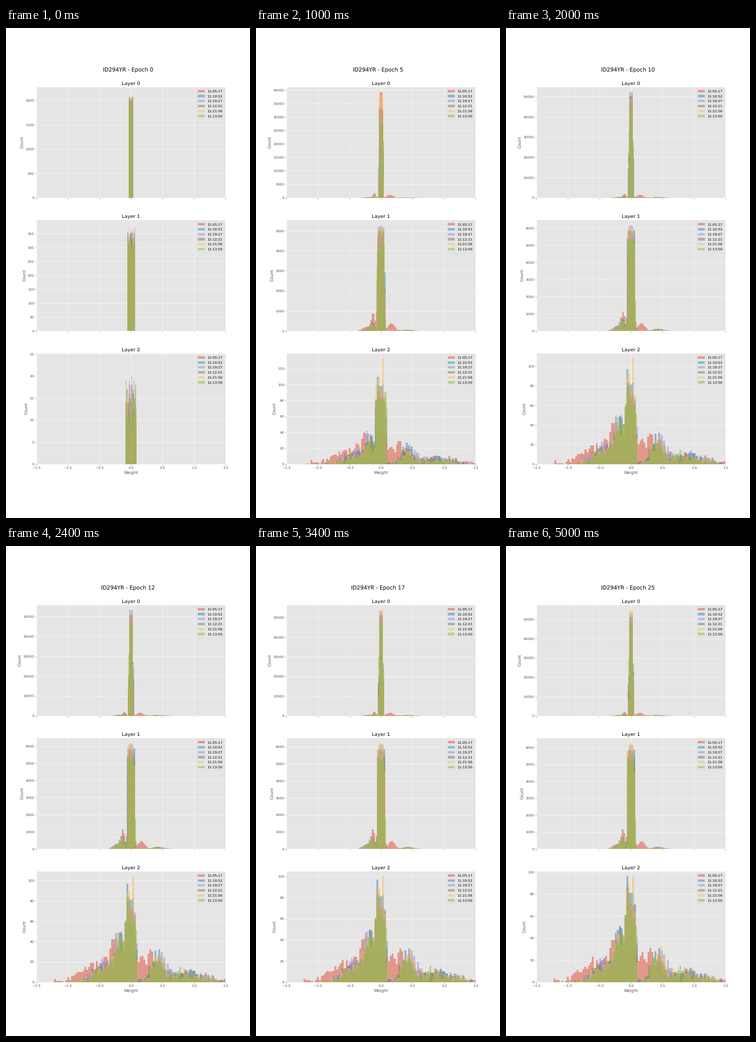
Recreate the animation shown at these times as a matplotlib script. Size 529 by 1058 pixels, loop 5200 ms.

```python
import math
from collections import namedtuple

import matplotlib.pyplot as plt
import numpy as np
from matplotlib.animation import FuncAnimation
from matplotlib.collections import PolyCollection
from matplotlib.patches import Patch

plt.style.use("ggplot")
plt.rcParams["text.hinting"] = "none"

EPOCHS = 26
BINS = 100

# span: final weight range in layer 0; tau, power: how the range grows;
# lag: how far the moved share trails the range; shift: scale of the bumps.
Run = namedtuple("Run", "label color span tau power lag shift")
RUNS = [
    Run("11:05:17", "#E24A33", 1.96, 3.4, 1, .5, 1),
    Run("11:10:52", "#348ABD", 1.91, 5.2, 2, 2, .97),
    Run("11:19:27", "#988ED5", 1.98, 5.2, 2, 2, 1.1),
    Run("11:12:21", "#777777", 1.89, 5.1, 2, 2, .98),
    Run("11:21:56", "#FBC15E", 2.03, 4.5, 1, 2, 1.03),
    Run("11:13:50", "#8EBA42", 1.74, 5.6, 2, 2, .96),
]

# growth and pace scale a run's span and tau. Bumps are the weights that
# leave the uniform start, as (share, centre, sigma).
Layer = namedtuple("Layer", "n_in n_out growth pace first_bumps bumps")
LAYERS = [
    Layer(784, 256, 1, 1,
          [(.032, -.105, .022), (.012, -.2, .05), (.05, .14, .05)],
          [(.015, -.11, .022), (.01, -.2, .03), (.014, .42, .06)]),
    Layer(256, 128, 1.32, .75,
          [(.1, -.125, .03), (.045, -.23, .06), (.08, .16, .06)],
          [(.06, -.135, .028), (.035, -.22, .04), (.025, .43, .07)]),
    Layer(128, 10, 1.55, .62,
          [(.46, -.38, .34), (.12, -.22, .12), (.14, .26, .12), (.22, .75, .38)],
          [(.17, -.17, .07), (.22, -.35, .2), (.13, .42, .085), (.16, .85, .27)]),
]

rng = np.random.default_rng(11)
noise = rng.normal(size=(2, len(LAYERS), len(RUNS), BINS))
jitter = rng.uniform(-.15, .15, size=(len(LAYERS), len(RUNS)))
erf = np.vectorize(math.erf)


def normal_cdf(x, mu, sigma):
    return .5 * (1 + erf((x - mu) / (sigma * math.sqrt(2))))


def histogram(i, j, epoch):
    """Bin edges and counts of the weights of run j in layer i."""
    layer, run = LAYERS[i], RUNS[j]
    half = 1 / math.sqrt(layer.n_in)
    rise = 1 - math.exp(-(epoch / (run.tau * layer.pace)) ** run.power)
    span = 2 * half + (run.span * layer.growth - 2 * half) * rise
    left = 44.5 + jitter[i, j] if epoch else BINS / 2
    edges = (np.arange(BINS + 1) - left) * span / BINS

    moved = rise ** run.lag
    bumps = layer.bumps if j else layer.first_bumps
    stay = 1 - moved * sum(share for share, _, _ in bumps)
    cdf = stay * np.clip((edges + half) / (2 * half), 0, 1)
    for share, mu, sigma in bumps:
        cdf += moved * share * normal_cdf(edges, mu * run.shift, sigma * run.shift)

    mean = layer.n_in * layer.n_out * np.diff(cdf)
    drift = .03 * epoch
    wobble = noise[0, i, j] * math.cos(drift) + noise[1, i, j] * math.sin(drift)
    counts = np.round(mean + np.sqrt(mean) * wobble)
    return edges, np.maximum(counts, 0)


def bar_corners(edges, counts):
    x0, x1, zero = edges[:-1], edges[1:], np.zeros(BINS)
    xs = np.stack([x0, x0, x1, x1], axis=1)
    ys = np.stack([zero, counts, counts, zero], axis=1)
    return np.stack([xs, ys], axis=2)


fig, axes = plt.subplots(3, 1, sharex=True, figsize=(10, 20), dpi=52.9)
title = fig.suptitle("", y=.92, fontsize=16)
handles = [Patch(facecolor=run.color, alpha=.5, linewidth=0, label=run.label)
           for run in RUNS]
bars = []
for i, ax in enumerate(axes):
    ax.set_title(f"Layer {i}")
    ax.set_ylabel("Count")
    ax.set_xlim(-1.5, 1.5)
    ax.legend(handles=handles, loc="upper right", labelspacing=.54)
    row = [PolyCollection([], facecolors=run.color, edgecolors="none",
                          linewidths=0, alpha=.5) for run in RUNS]
    for poly in row:
        ax.add_collection(poly, autolim=False)
    bars.append(row)
axes[-1].set_xlabel("Weight")


def draw(epoch):
    title.set_text(f"ID294YR - Epoch {epoch}")
    for i, ax in enumerate(axes):
        peak = 0
        for j, poly in enumerate(bars[i]):
            edges, counts = histogram(i, j, epoch)
            poly.set_verts(bar_corners(edges, counts))
            peak = max(peak, counts.max())
        ax.set_ylim(0, 1.05 * peak)


anim = FuncAnimation(fig, draw, frames=EPOCHS, interval=200, repeat=True)
plt.show()
```
